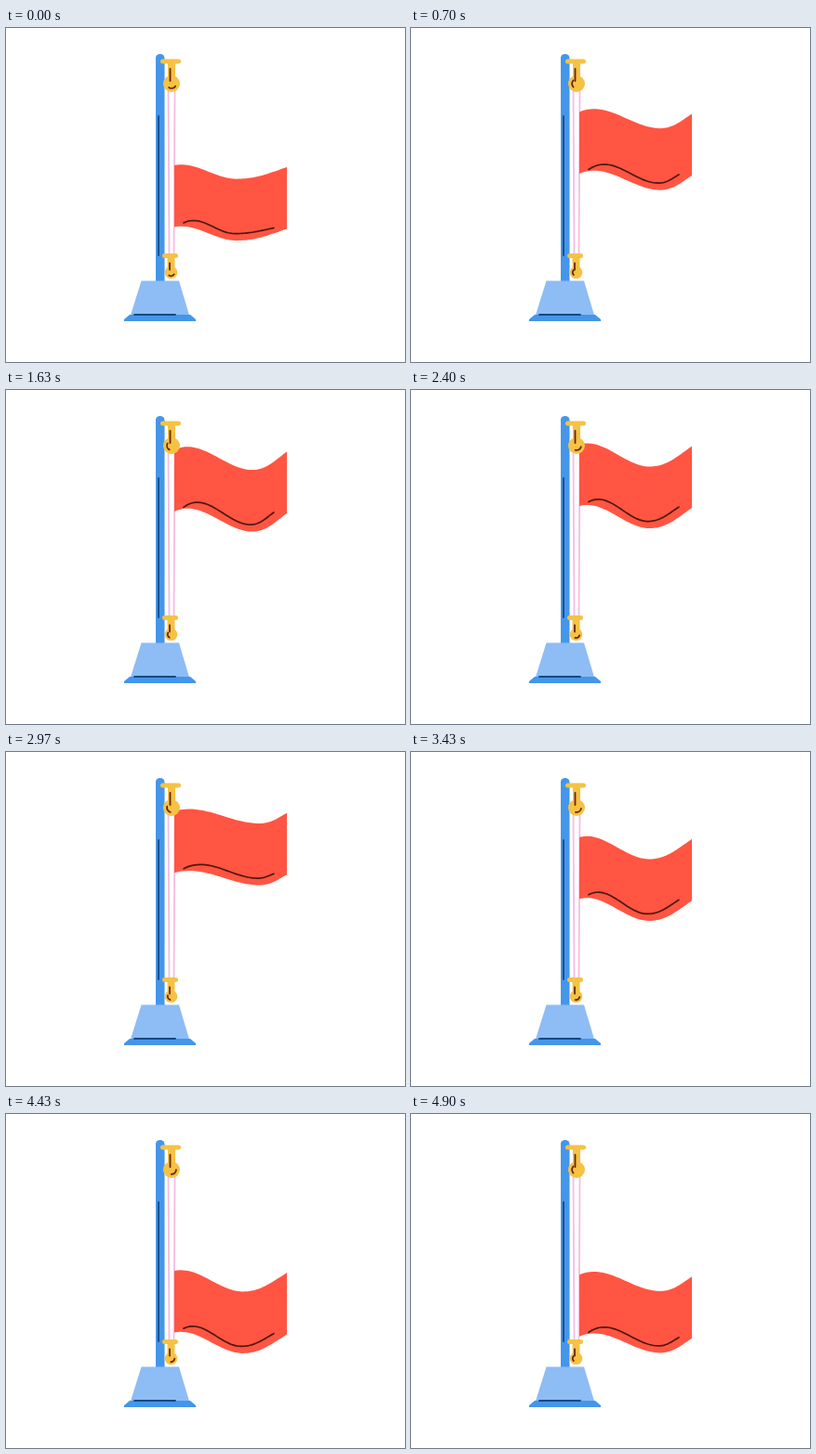
These frames come from a looping animation (429x360 px, 5 s). An HTML page with a canvas:

```html
<!DOCTYPE html>
<html>
<head>
<meta charset="utf-8">
<style>
  html, body { margin: 0; width: 100%; height: 100%; overflow: hidden; background: #fff; }
  canvas { display: block; }
</style>
</head>
<body>
<canvas id="stage" width="429" height="360"></canvas>
<script>
const ctx = document.getElementById('stage').getContext('2d');
const BLUE = '#4496ea', PALE = '#8ebcf5', NAVY = '#17497f', GOLD = '#f5c244';
const RED = '#ff5542', DARK = '#4a190f', BROWN = '#6b2412', PINK = '#f6bce2';
const LOOP = 5000, TICK = 1000 / 30, WAVE = 1050;
const FLAG_LEFT = 181, FLAG_RIGHT = 302, FLAG_HEIGHT = 66.5;

// The picture holds for two ticks, and for three once in every 21.
function heldTime(ms) {
  const tick = Math.floor((ms % LOOP) / TICK + .15);
  const part = tick % 21;
  const held = part < 3 ? 0 : part - (part - 3) % 2;
  return (tick - part + held) * TICK;
}

function poseAt(t) {
  const phase = t / WAVE % 1;
  const swing = peak => Math.cos(2 * Math.PI * (phase - peak));
  return {
    // quick hoist that slows near the top, then a soft drop
    y: 54 + 94 * Math.exp(-t / 740) + 120 / (1 + Math.exp((3640 - t) / 255)),
    // the trough drifts right, then snaps back for the next ripple
    troughX: 248 + 30 * Math.min(phase, 9 * (1 - phase)),
    depth: 19 + 6 * swing(.38),
    lift: 9 + 5 * swing(.58),
    angle: 1.95 - 1.2 * swing(.17)
  };
}

function bezier(a, b, c, d) {
  const at = (u, k) => {
    const v = 1 - u;
    return a[k] * v ** 3 + 3 * b[k] * v * v * u + 3 * c[k] * v * u * u + d[k] * u ** 3;
  };
  return Array.from({ length: 25 }, (_, i) => [at(i / 24, 0), at(i / 24, 1)]);
}

// Rises by lift from the start, dips to the trough and climbs to the end.
function ripple([x0, y0], [x1, y1], [x2, y2], lift) {
  const down = x1 - x0, up = x2 - x1;
  return [
    ...bezier([x0, y0], [x0 + .35 * down, y0 - lift], [x1 - .35 * down, y1], [x1, y1]),
    ...bezier([x1, y1], [x1 + .4 * up, y1], [x2 - .35 * up, (y1 + y2) / 2], [x2, y2])
  ];
}

function line(color, width, ...points) {
  ctx.strokeStyle = color;
  ctx.lineWidth = width;
  ctx.beginPath();
  for (const [x, y] of points) ctx.lineTo(x, y);
  ctx.stroke();
}

function shape(color, ...points) {
  ctx.fillStyle = color;
  ctx.beginPath();
  for (const [x, y] of points) ctx.lineTo(x, y);
  ctx.fill();
}

function disc(color, x, y, radius) {
  ctx.fillStyle = color;
  ctx.beginPath();
  ctx.arc(x, y, radius, 0, 2 * Math.PI);
  ctx.fill();
}

function pole() {
  disc(BLUE, 165.7, 32.7, 4.8);
  shape(BLUE, [161, 33], [170.5, 33], [170.5, 274], [161, 274]);
  line(NAVY, 1.8, [164, 95], [164, 245]);
  shape(PALE, [145.5, 272.5], [186, 272.5], [197, 309.5], [134, 309.5]);
  shape(BLUE, [133, 309], [198, 309], [204, 314], [204, 316], [127, 316], [127, 314]);
  line(NAVY, 1.8, [138, 309], [182, 309]);
}

function flag({ y, troughX, depth, lift }) {
  const edge = top => ripple([FLAG_LEFT, top], [troughX, top + depth], [FLAG_RIGHT, top + 2], lift);
  shape(RED, ...edge(y), ...edge(y + FLAG_HEIGHT).reverse());
  line(DARK, 1.7, ...ripple([191, y + 62], [troughX - 2, y + depth + 59], [288, y + 67.5], lift + 5));
}

function pulley(x, barY, barHalf, wheelY, radius, angle) {
  line(GOLD, 5, [x - 1 - barHalf, barY], [x - 1 + barHalf, barY]);
  shape(GOLD, [x - 4, barY], [x + 4, barY], [x + 4, wheelY], [x - 4, wheelY]);
  disc(GOLD, x, wheelY, radius);
  line(BROWN, 1.8, [x - 1.5, barY + 8], [x - 1.5, wheelY - 3]);
  ctx.beginPath();
  ctx.arc(x, wheelY, radius * .55, angle - .8, angle + .8);
  ctx.stroke();
}

function draw(ms) {
  const pose = poseAt(heldTime(ms));
  ctx.fillStyle = '#fff';
  ctx.fillRect(0, 0, 429, 360);
  ctx.lineCap = ctx.lineJoin = 'round';
  pole();
  line(PINK, 1.8, [174.5, 66], [175.5, 243]);
  line(PINK, 1.8, [181.5, 66], [180.5, 243]);
  flag(pose);
  pulley(178, 36, 8.5, 60, 9, pose.angle);
  pulley(177.5, 245.5, 6, 263.5, 6.8, pose.angle);
}

const start = performance.now();
function frame() {
  draw(performance.now() - start);
  requestAnimationFrame(frame);
}
frame();
</script>
</body>
</html>
```
